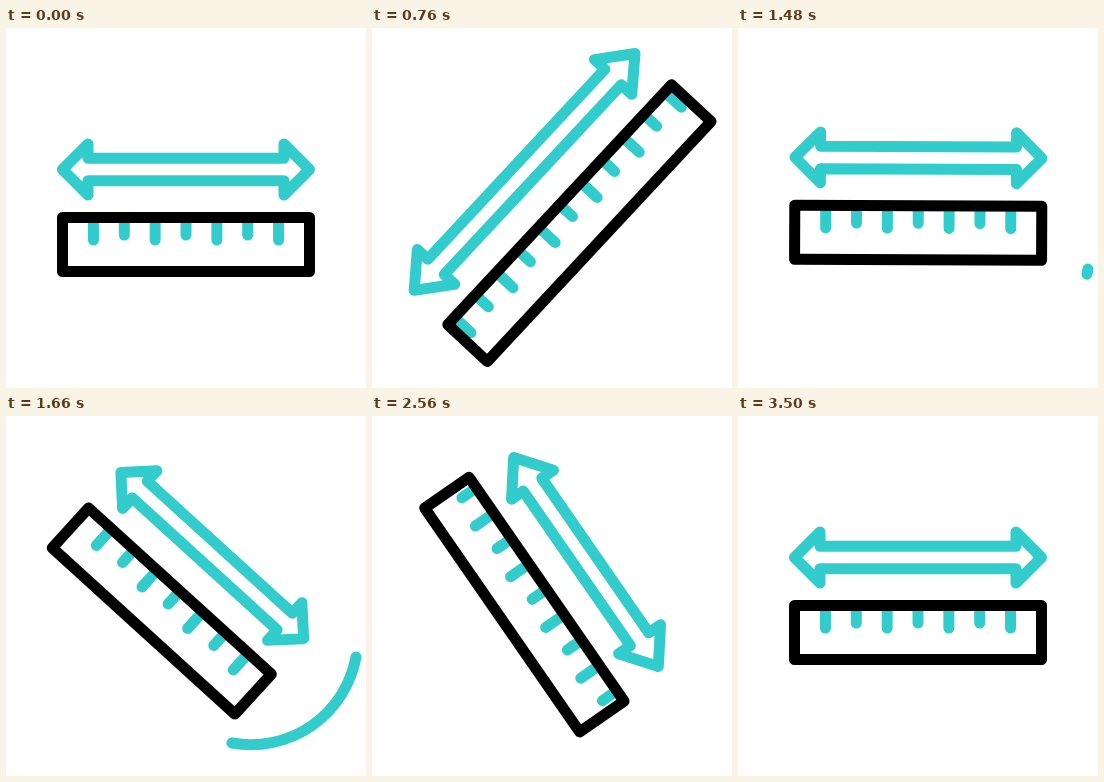
An HTML page for the animation above (3600 ms loop, 360 px wide and 360 px high).

```html
<!DOCTYPE html>
<html lang="en">
<head>
<meta charset="utf-8">
<title>Ruler</title>
<style>
html, body { margin: 0; width: 100%; height: 100%; overflow: hidden; background: #fff; }
svg { display: block; width: 100vw; height: 100vh; }
.line { fill: none; stroke-width: 11; stroke-linecap: round; stroke-linejoin: round; }
.cyan { stroke: #33cccc; }
.black { stroke: #000; }
</style>
</head>
<body>
<svg viewBox="0 0 360 360">
  <defs><clipPath id="inside"><rect id="clip" y="10.5" height="54"/></clipPath></defs>
  <path id="trail" class="line cyan"/>
  <g id="tool">
    <path id="arrow" class="line cyan"/>
    <g clip-path="url(#inside)"><path id="ticks" class="line cyan"/></g>
    <rect id="ruler" class="line black" y="10.5" height="54"/>
  </g>
</svg>
<script>
const LOOP = 3600;
const REST = 123.5;   // half length of ruler and arrow when not stretched
const STEP = 30.85;   // distance between ticks
const $ = id => document.getElementById(id);

// Each track lists [ms, value] keys.
const tracks = {
  angle: [[0, 0], [200, -6], [420, -23.1], [540, -39], [680, -47], [1140, -47], [1300, -46],
    [1480, 0], [1660, 42.2], [1840, 53], [2100, 55.3], [3220, 55.3], [3240, 53.3], [3360, 27], [3500, 0]],
  x: [[0, 180], [1300, 180], [1660, 181], [2100, 183.2], [3240, 183.2], [3500, 180]],
  y: [[0, 179], [200, 156], [420, 132.8], [540, 154], [680, 169.5], [1140, 169.5], [1300, 167.3],
    [3240, 167.3], [3500, 179]],
  ruler: [[0, REST], [540, REST], [700, 152], [860, 177], [1140, 177], [1220, 150], [1300, REST],
    [2380, REST], [2560, 136], [2680, 168], [2780, 174.5], [3220, 174.5], [3240, 174], [3360, 149], [3500, REST]],
  arrow: [[0, REST], [540, REST], [700, 150], [860, 175], [1140, 175], [1220, 150], [1300, 124.5],
    [1400, REST], [2380, REST], [2560, 127], [2680, 153], [2780, 162], [3220, 162], [3240, 161], [3360, 145], [3500, REST]],
  head: [[0, 25.5], [540, 25.5], [860, 34], [1140, 34], [1300, 25.5], [2380, 25.5], [2560, 33],
    [2780, 36], [3240, 36], [3500, 25.5]],
  trailEnd: [[1460, 10.3], [1660, 100.3]],
  trailStart: [[1660, 10.3], [1880, 100.3]]
};

// Smooth interpolation through the keys without overshoot.
function value(keys, t) {
  const last = keys.length - 1;
  if (t <= keys[0][0]) return keys[0][1];
  if (t >= keys[last][0]) return keys[last][1];
  const i = keys.findIndex(k => k[0] > t) - 1;
  const slope = j => (keys[j + 1][1] - keys[j][1]) / (keys[j + 1][0] - keys[j][0]);
  const tangent = j => {
    if (j === 0 || j === last) return 0;
    const a = slope(j - 1), b = slope(j);
    return a * b > 0 ? 2 * a * b / (a + b) : 0;
  };
  const [t0, v0] = keys[i], [t1, v1] = keys[i + 1];
  const d = t1 - t0, u = (t - t0) / d, w = 1 - u;
  return v0 * (1 + 2 * u) * w * w + v1 * u * u * (3 - 2 * u)
    + d * u * w * (w * tangent(i) - u * tangent(i + 1));
}

function arrowPath(half, head) {
  const neck = half - head, mid = -37.5;
  const right = [[neck, -11.25], [neck, -25.5], [half, 0], [neck, 25.5], [neck, 11.25]];
  const left = right.map(([x, y]) => [-x, -y]);
  return 'M' + [...right, ...left].map(([x, y]) => `${x} ${y + mid}`).join('L') + 'Z';
}

function tickPath(half) {
  let d = '';
  for (let i = -5; i <= 5; i++) {
    if (Math.abs(i * STEP) < half - 2) d += `M${i * STEP} 12V${i % 2 ? 33 : 28}`;
  }
  return d;
}

function arcPath(from, to) {
  if (to - from < 0.5) return '';
  const r = 106.7;
  const at = deg => {
    const a = deg * Math.PI / 180;
    return `${245 + r * Math.cos(a)} ${222 + r * Math.sin(a)}`;
  };
  return `M${at(from)}A${r} ${r} 0 0 1 ${at(to)}`;
}

function draw(t) {
  const p = {};
  for (const name in tracks) p[name] = value(tracks[name], t);
  $('tool').setAttribute('transform', `translate(${p.x} ${p.y}) rotate(${p.angle})`);
  for (const id of ['ruler', 'clip']) {
    $(id).setAttribute('x', -p.ruler);
    $(id).setAttribute('width', 2 * p.ruler);
  }
  $('ticks').setAttribute('d', tickPath(p.ruler));
  $('arrow').setAttribute('d', arrowPath(p.arrow, p.head));
  $('trail').setAttribute('d', arcPath(p.trailStart, p.trailEnd));
}

const start = performance.now();
function frame() {
  draw((performance.now() - start) % LOOP);
  requestAnimationFrame(frame);
}
draw(0);
requestAnimationFrame(frame);
</script>
</body>
</html>
```
